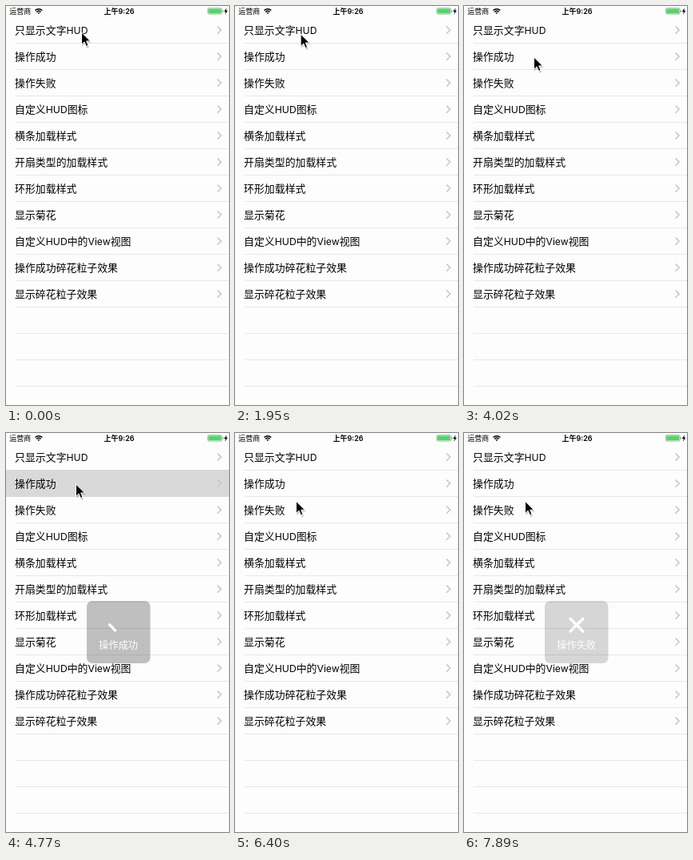
Animation of 279x499 px, one loop 8 s. Source, as an HTML page:

```html
<!DOCTYPE html>
<html lang="zh-CN">
<head>
<meta charset="utf-8">
<style>
  html, body { margin: 0; width: 100%; height: 100%; overflow: hidden; background: #fdfdfd; }
  svg { display: block; width: 279px; height: 499px; }
  text { font: 12.9px Inter, "Noto Sans CJK SC", "Noto Sans CJK", sans-serif; }
  .latin { font-size: 12.2px; }
  .status { font-size: 9px; }
  .clock { font-weight: 600; text-anchor: middle; }
  .line { stroke: #e7e7e9; }
  .chevron { fill: none; stroke: #c7c7cc; stroke-width: 1.5; }
  .hud rect { fill: #000; fill-opacity: .8; }
  .hud text { fill: #fff; font-size: 12.2px; font-weight: 500; text-anchor: middle; }
  .hud .hello { font-size: 11.7px; font-weight: 600; }
  .ink { fill: none; stroke: #fff; stroke-width: 3.5; stroke-linecap: round; stroke-linejoin: round; stroke-dasharray: 1 2; }
</style>
</head>
<body>
<svg viewBox="0 0 279 499">
  <text class="status" x="4.3" y="9.8">运营商</text>
  <g fill="none" stroke="#000" stroke-width="1.4">
    <path d="M36.5 5.6a6.2 6.2 0 0 1 8.8 0M38.2 7.4a3.8 3.8 0 0 1 5.4 0"/>
    <path d="M40.9 10.1l-1.4-1.4a2 2 0 0 1 2.8 0z" fill="#000" stroke="none"/>
  </g>
  <text class="status clock" x="141.5" y="9.8">上午9:26</text>
  <rect x="252.5" y="2.7" width="17.6" height="7.4" rx="1.6" fill="none" stroke="#777" stroke-width=".6"/>
  <rect x="253.3" y="3.5" width="16" height="5.8" rx=".8" fill="#4cd964"/>
  <path d="M270.8 5.2v2.6q1.2-.4 1.2-1.3t-1.2-1.3z" fill="#777"/>
  <path d="M276 2.6l-3.2 4.3h1.9l-.7 3.5 3.4-4.6h-2z"/>
  <g id="lines"></g>
  <rect id="press" width="279" height="34" fill="#d9d9d9"/>
  <g id="rows"></g>
  <g class="hud">
    <rect x="89" y="227" width="102.5" height="44" rx="7"/>
    <text class="hello" x="140.3" y="253.2">Hello World !</text>
  </g>
  <g class="hud">
    <rect x="101" y="210" width="79.5" height="78" rx="7"/>
    <path class="ink" pathLength="1" d="M129.5 239.8l8.2 8.2 15.3-15.5"/>
    <text x="140.7" y="269.6">操作成功</text>
  </g>
  <g class="hud">
    <rect x="101" y="210" width="79.5" height="78" rx="7"/>
    <path class="ink" pathLength="1" d="M133.2 232.4l15.6 15.6"/>
    <path class="ink" pathLength="1" d="M148.8 232.4l-15.6 15.6"/>
    <text x="140.7" y="269.6">操作失败</text>
  </g>
  <g id="cursor">
    <path d="M.7 1.2v16.2l3.7-3.5 2.5 5.8 2.6-1.1-2.4-5.7h5.2z" fill="#000" opacity=".22"/>
    <path d="M0 0v15.2l3.6-3.3 2.4 5.5 2.5-1.1-2.3-5.4h4.8z" stroke="#fff" stroke-width="1" stroke-linejoin="round"/>
  </g>
</svg>
<script>
const LOOP = 8000, TICK = 148.7, ROW = 33;
const titles = ['只显示文字HUD', '操作成功', '操作失败', '自定义HUD图标', '横条加载样式', '开扇类型的加载样式',
  '环形加载样式', '显示菊花', '自定义HUD中的View视图', '操作成功碎花粒子效果', '显示碎花粒子效果'];

// Taps, in ticks: glow is how long the row highlight lasts, gone when the HUD has faded.
const taps = [
  { row: 0, start: 4, glow: 2, gone: 8.2 },
  { row: 1, start: 19, glow: 3, gone: 7.9 },
  { row: 1, start: 32, glow: 3, gone: 8.2 },
  { row: 2, start: 45, glow: 3, gone: 8.38 },
];
// Pointer keys: tick, x, y
const path = [[0, 94.5, 33], [1, 81.5, 31.8], [12, 81.5, 31.8], [17, 87.5, 64], [39, 87.5, 64], [43, 76.5, 85.3], [54, 76.5, 85.3]];

const $ = id => document.getElementById(id);
const clamp = v => Math.max(0, Math.min(1, v));
const huds = [...document.querySelectorAll('.hud')];

for (let i = 0; i < 14; i++) {
  const y = 46.5 + i * ROW;
  $('lines').innerHTML += `<path class="line" d="M12 ${y}H279"/>`;
}
titles.forEach((title, i) => {
  const y = 30 + i * ROW;
  const label = title.replace(/[a-z]+/gi, '<tspan class="latin">$&</tspan>');
  $('rows').innerHTML += `<text x="11.1" y="${y + 4.6}">${label}</text>
    <path class="chevron" d="M264.5 ${y - 4.5}l4.7 4.6-4.7 4.6"/>`;
});

function pointer(n) {
  const i = Math.max(1, path.findIndex(k => k[0] >= n));
  const [a, b] = [path[i - 1], path[i]];
  const p = clamp((n - a[0]) / (b[0] - a[0])), e = p * p * (3 - 2 * p);
  return [1, 2].map(j => a[j] + (b[j] - a[j]) * e);
}

function draw(n) {
  const tap = taps.findLast(t => n >= t.start);
  const k = tap ? n - tap.start : 0;
  $('press').setAttribute('opacity', tap ? clamp(1 - k / tap.glow) : 0);
  $('press').setAttribute('y', 13 + (tap ? tap.row : 0) * ROW);
  huds.forEach((hud, i) => {
    const on = tap && tap.row === i;
    hud.setAttribute('opacity', on ? clamp(Math.min(.3 + k * .55, (tap.gone - k) / 2)) : 0);
    const inks = hud.querySelectorAll('.ink');
    inks.forEach((ink, j) => {
      ink.style.strokeDashoffset = 1 - clamp((.3 + .3 * k) * inks.length - j);
    });
  });
  $('cursor').setAttribute('transform', `translate(${pointer(n)})`);
}

const begin = performance.now();
function frame() {
  draw(Math.floor((performance.now() - begin) % LOOP / TICK));
  requestAnimationFrame(frame);
}
frame();
</script>
</body>
</html>
```
